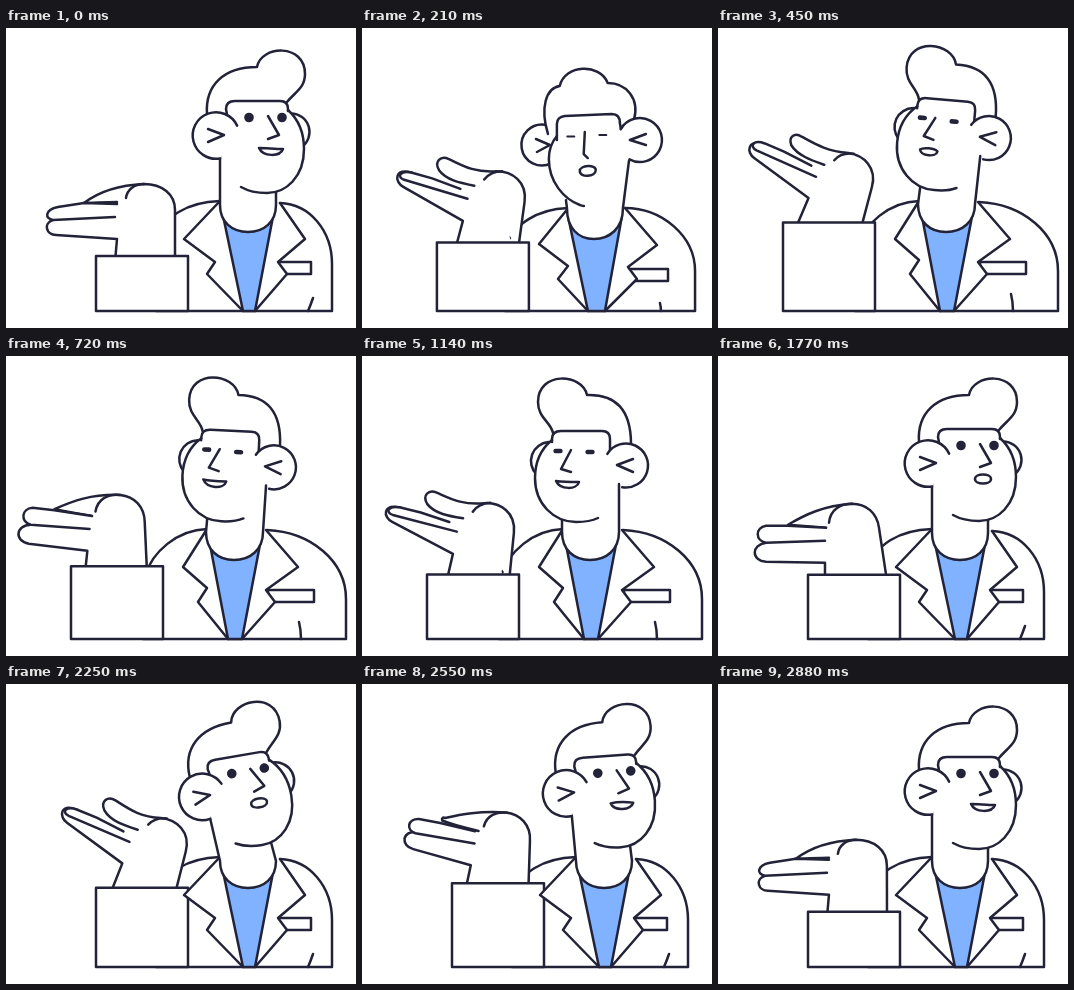
An HTML page that plays this animation: 350x300 px, repeating every 2.91 s.

```html
<!DOCTYPE html>
<html lang="en">
<head>
<meta charset="utf-8">
<title>Talking doctor</title>
<style>
  html, body { margin: 0; width: 100%; height: 100%; overflow: hidden; background: #fff; }
  svg { display: block; width: 100vw; height: 100vh; }
</style>
</head>
<body>
<svg id="stage" viewBox="0 0 350 300" fill="#fff" stroke="#222338" stroke-width="2.5"
     stroke-linejoin="round" stroke-linecap="round"></svg>
<script>
const LOOP = 2910, WAVE = LOOP / 3, INK = '#222338', BLUE = '#80b2ff';
const stage = document.getElementById('stage');

// Each shape has three poses with the same path structure: facing right, front, left.
const BODY = {
  coat: [
    'M150 215C156 188 182 174 214 173M274 175C304 176 326 203 326 236L326 283L150 283',
    'M143 222C150 196 176 181 206 180M263 180C300 180 333 208 333 243L333 283L143 283',
    'M139 220C146 196 171 174 201 173M261 174C305 176 340 205 340 243L340 283L137 283'],
  sleeve: ['M307 270Q305 276 302 283', 'M298 275Q299 279 299 283', 'M293 266Q295 274 295 283'],
  pocket: [
    'M270 234L305 234L305 246L270 246Z',
    'M266 241L306 241L306 253L266 253Z',
    'M262 234L308 234L308 246L262 246Z'],
  lapels: [
    'M214 173L178 211L209 234L201 246L237 283M274 175L299 211L272 234L281 246L249 283',
    'M208 178L177 216L206 238L196 251L226 283M263 180L295 217L266 239L275 251L243 283',
    'M201 173L177 211L201 232L192 246L222 283M260 174L292 211L260 234L269 246L236 283'],
  shirt: [
    'M215 178L237 283L249 283L269 178Z',
    'M206 188L226 283L243 283L260 188Z',
    'M202 178L222 283L236 283L256 178Z']
};
const COLLAR = [
  'L214 177C214 194 226 204 242 204C258 204 270 194 270 177',
  'L205 180C205 200 216 211 232 211C248 211 261 200 261 180',
  'L200 176C200 194 212 204 228 204C244 204 257 194 257 176'];
const NECK_TOPS = ['214 128 270 163', '204 172 267 133', '200 160 257 128'];
const HEAD = {
  hair: [
    'M201 86C199 57 218 39 251 39C255 17 299 15 299 46C299 60 289 64 281 74',
    'M186 106C178 80 184 60 198 58C203 36 238 35 246 55C264 55 278 70 272 92',
    'M191 77C189 66 176 62 176 46C176 15 220 17 225 39C254 38 269 54 269 88'],
  jawRight: [
    'M282 82C293 92 298 106 298 121C298 149 280 165 261 165C251 165 242 163 235 159',
    'M258 98C264 108 266 120 266 130C266 158 250 178 228 178C220 178 212 176 206 172',
    'M248 95C252 102 256 115 256 125C256 150 240 166 220 166C212 166 206 164 200 160'],
  jawLeft: [
    'M221 90C216 100 214 110 214 122C214 148 228 165 248 165C256 165 262 164 268 162',
    'M195 108C190 114 187 122 187 131C187 154 202 171 218 177C219 177 220 178 222 178',
    'M190 84C179 93 173 107 173 122C173 148 192 166 214 166C222 166 230 165 236 162'],
  hairline: [
    'M222 92L220 81Q220 73 229 73L274 73Q282 73 282 81L282 83',
    'M195 112L195 96Q195 89 203 88L250 86Q258 86 258 95L259 101',
    'M190 86L190 83Q190 75 199 75L240 75Q248 75 248 83L248 95'],
  nose: ['M262 88L273 107L262 111', 'M223 104L222 126L226 130', 'M209 94L199 113L209 116']
};
const MOUTH = [
  // smiling
  'M253 120C260 120 269 121 277 121C274 129 257 129 253 120Z',
  'M216 141C221 141 230 141 236 141C234 149 219 149 216 141Z',
  'M194 125C201 126 209 126 217 126C215 134 198 134 194 125Z',
  // rounded
  'M257 123C257 117 273 117 273 123C273 129 257 129 257 123Z',
  'M218 143C218 137 234 136 234 142C234 149 218 150 218 143Z',
  'M198 128C198 123 212 123 212 128C212 133 198 133 198 128Z'];
// centre, radius, start and end angle
const EARS = {
  left: ['210 107.5 23.3 -25 80', '180 117 20.5 -80 62', '188 105 19 -95 135'],
  right: ['285 104 18.5 -90 55', '278 112 22 -150 118', '264 109.5 22 -148 100']
};
const ARROWS = {
  left: ['M202 101L218 107L202 114', 'M174 111L188 117L175 124', 'M182 100L194 105L183 110'],
  right: ['M291 99L280 104L291 109', 'M284 106L268 112L284 117', 'M271 103L255 109L271 116']
};
// centre, half width, half height
const EYES = [
  ['243 89.5 4.8 4.8', '209 108.5 4.5 1', '196 95 4.7 2.3'],
  ['276 89.5 4.8 4.8', '241 107 4.5 1', '228 96 4.7 2.3']];
// Poses: half raised, open, flat; measured from the cuff's top left corner.
const HAND = {
  thumb: [
    'M21 -54C9 -54 -3 -53 -12 -53C-13 -53 -13 -53 -12 -53C5 -66 25 -71 48 -72C66 -72 79 -62 79 -46L79 6',
    'M38 -57C24 -60 10 -63 3 -73C-2 -82 5 -88 13 -84C27 -77 38 -70 60 -71C76 -71 91 -60 88 -40L81 6',
    'M18 -47C6 -48 -8 -49 -20 -50C-20 -50 -20 -50 -20 -50C-3 -60 15 -69 44 -71C58 -71 69 -62 71 -47L79 6'],
  lower: [
    'M-43 -36C-53 -33 -50 -21 -40 -21L21 -17L19 6',
    'M-24 -71C-42 -76 -42 -62 -33 -57L26 -22L18 6',
    'M-42 -32C-57 -30 -57 -14 -42 -13L17 -12L17 6'],
  upper: [
    'M21 -52L-12 -53L-38 -49C-52 -46 -51 -37 -43 -36L19 -39',
    'M24 -54L-4 -65L-24 -71C-36 -74 -40 -67 -32 -64L31 -44',
    'M18 -47L-20 -49L-42 -49C-53 -47 -53 -34 -42 -32L17 -34'],
  knuckle: [
    'M30 -58C31 -66 38 -72 48 -72',
    'M48 -63C52 -68 58 -71 66 -71',
    'M21 -52C22 -65 32 -71 44 -71']
};

// Keys as [time, value]
const TURN = [[10, 0], [410, 1], [1335, 1], [1735, 0]];
const TILT = [[330, 0], [540, 8], [720, 2.8], [1000, 0], [1770, 0], [2150, -9.7], [2290, -9.7], [2760, 0]];
const LIFT = [[330, 0], [520, -4], [700, 0], [1150, 0], [1260, -5], [1400, 0]];
const ROUND = [[90, 0], [170, 1], [400, 1], [520, 0], [1380, 0], [1540, 1], [2420, 1], [2600, 0]];
const HAND_OPEN = [[0, 0], [.18, 1], [.4, 1], [.74, 0]];
const HAND_FLAT = [[.4, 0], [.74, 1], [.84, 1], [.98, 0]];
const HAND_TURN = [[0, 0], [.17, -3], [.32, 5.6], [.45, 8], [.74, 6], [.83, 0], [1, 0]];

function keyed(keys, t) {
  const i = keys.findIndex(k => k[0] > t);
  if (i === 0) return keys[0][1];
  if (i < 0) return keys[keys.length - 1][1];
  const [t0, a] = keys[i - 1], [t1, b] = keys[i];
  const u = (t - t0) / (t1 - t0);
  return a + (b - a) * u * u * (3 - 2 * u);
}

const NUMBER = /-?\d+(\.\d+)?/g;
function blend(poses, weights) {
  const values = poses.map(p => p.match(NUMBER).map(Number));
  let i = 0;
  return poses[0].replace(NUMBER, () => {
    const sum = values.reduce((s, v, k) => s + v[i] * weights[k], 0);
    i++;
    return sum.toFixed(2);
  });
}
const blendNumbers = (poses, weights) => blend(poses, weights).split(' ').map(Number);
// Smooth curve through the three poses at 0, 0.5 and 1
const through = h => [(1 - h) * (1 - 2 * h), 4 * h * (1 - h), h * (2 * h - 1)];

function add(parent, tag, attrs = {}) {
  const el = document.createElementNS('http://www.w3.org/2000/svg', tag);
  set(el, attrs);
  return parent.appendChild(el);
}
function set(el, attrs) {
  for (const name in attrs) el.setAttribute(name, attrs[name]);
}
function addPaths(parent, shapes) {
  return Object.keys(shapes).map(name => [add(parent, 'path'), shapes[name], name]);
}
const drawAll = (parts, weights) =>
  parts.forEach(([el, poses]) => set(el, { d: blend(poses, weights) }));

const bodyParts = addPaths(stage, BODY);
set(bodyParts[4][0], { fill: BLUE });
const neck = add(stage, 'path');
const head = add(stage, 'g');
const farEar = add(head, 'path'), farArrow = add(head, 'path', { fill: 'none' });
const headParts = addPaths(head, HEAD);
const nearEar = add(head, 'path'), nearArrow = add(head, 'path', { fill: 'none' });
const mouth = add(head, 'path');
const eyes = EYES.map(poses => [add(head, 'rect', { fill: INK, stroke: 'none' }), poses]);
set(headParts[3][0], { fill: 'none' });
set(headParts[4][0], { fill: 'none' });
const hand = add(stage, 'g');
add(hand, 'path', { d: 'M22 6L36 -45L60 -45L76 6Z', stroke: 'none' });
const handParts = addPaths(hand, HAND);
set(handParts[3][0], { fill: 'none' });
const cuff = add(stage, 'rect', { width: 92 });
// The arm lies over the coat but under the lapels.
bodyParts[0][0].after(hand, cuff);

function earPath(side, w) {
  const [x, y, r, from, to] = blendNumbers(EARS[side], w);
  const at = deg => {
    const a = deg * Math.PI / 180;
    return `${x + r * Math.cos(a)} ${y + r * Math.sin(a)}`;
  };
  const span = side === 'left' ? 360 - (to - from) : to - from;
  return `M${at(from)}A${r} ${r} 0 ${span > 180 ? 1 : 0} ${side === 'left' ? 0 : 1} ${at(to)}`;
}

function drawHead(t, h, w) {
  const tilt = keyed(TILT, t), lift = keyed(LIFT, t);
  const px = 235 - 7 * h, py = 191;
  const a = tilt * Math.PI / 180, cos = Math.cos(a), sin = Math.sin(a);
  const place = (x, y) =>
    `${px + (x - px) * cos - (y - py) * sin} ${py + (x - px) * sin + (y - py) * cos + lift}`;
  const [lx, ly, rx, ry] = blendNumbers(NECK_TOPS, w);
  set(neck, { d: `M${place(lx, ly)}${blend(COLLAR, w)}L${place(rx, ry)}` });
  set(head, { transform: `translate(0 ${lift}) rotate(${tilt} ${px} ${py})` });

  const near = h < .3 ? 'left' : 'right', far = h < .3 ? 'right' : 'left';
  drawAll(headParts, w);
  for (const [el, , name] of headParts) {
    if (name.startsWith('jaw')) {
      set(el, { display: name === (near === 'left' ? 'jawRight' : 'jawLeft') ? 'inline' : 'none' });
    }
  }
  set(nearEar, { d: earPath(near, w) });
  set(farEar, { d: earPath(far, w) });
  set(nearArrow, { d: blend(ARROWS[near], w) });
  set(farArrow, { d: blend(ARROWS[far], w) });

  const round = keyed(ROUND, t);
  set(mouth, { d: blend(MOUTH, [...w.map(v => v * (1 - round)), ...w.map(v => v * round)]) });
  for (const [el, poses] of eyes) {
    const [x, y, hw, half] = blendNumbers(poses, w);
    const hh = Math.max(.9, half);
    set(el, { x: x - hw, y: y - hh, width: 2 * hw, height: 2 * hh, rx: hh });
  }
}

function drawArm(t, w) {
  const phase = t % WAVE / WAVE;
  const x = 90 * w[0] + 75 * w[1] + 65 * w[2];
  const y = 211 + 17 * Math.cos(2 * Math.PI * phase);
  const open = keyed(HAND_OPEN, phase), flat = keyed(HAND_FLAT, phase);
  drawAll(handParts, [1 - open - flat, open, flat]);
  set(hand, { transform: `translate(${x} ${y}) rotate(${keyed(HAND_TURN, phase)} 50 -20)` });
  set(cuff, { x, y, height: 283 - y });
}

function draw(t) {
  const h = keyed(TURN, t), w = through(h);
  drawAll(bodyParts, w);
  drawHead(t, h, w);
  drawArm(t, w);
}

const start = performance.now();
function tick() {
  draw((performance.now() - start) % LOOP);
  requestAnimationFrame(tick);
}
tick();
</script>
</body>
</html>
```
